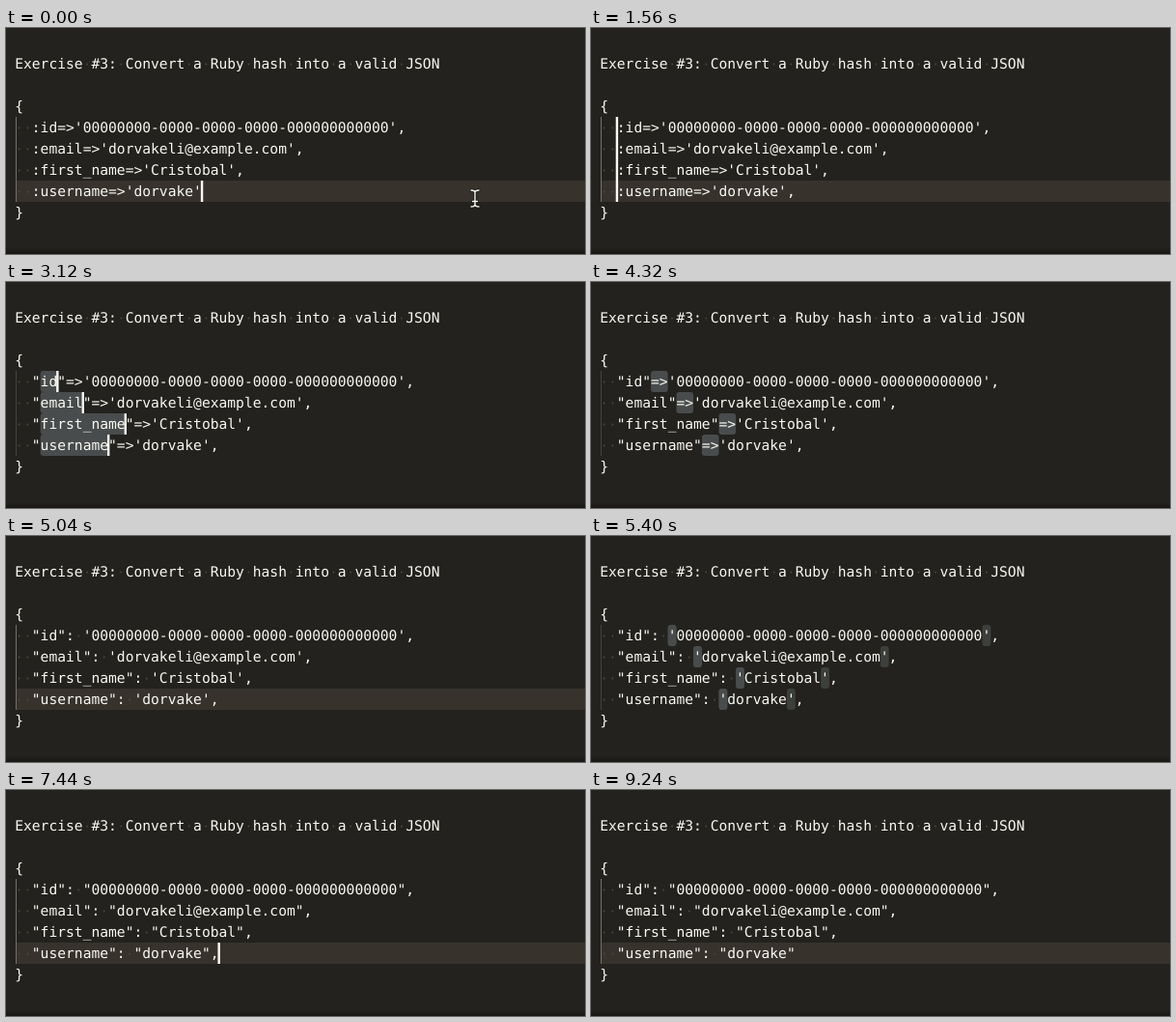
Animation, 600 px wide and 234 px high, one loop 9480 ms. Source, as an HTML page:

```html
<!DOCTYPE html>
<html lang="en">
<head>
<meta charset="utf-8">
<title>Ruby hash to JSON</title>
<style>
  html, body { margin: 0; width: 100%; height: 100%; overflow: hidden; background: #23221e; }
  svg { display: block; }
  text {
    font: 14.63px "DejaVu Sans Mono", monospace;
    fill: #f8f8f2;
    white-space: pre;
    text-rendering: geometricPrecision;
  }
  .dot { fill: #4b4a43; }
  .line { fill: #37332c; }
  .sel { fill: #494c4d; }
  .match { fill: #3d3f3d; }
  .caret { fill: #fbfbf6; }
</style>
</head>
<body>
<svg width="600" height="234" viewBox="0 0 600 234">
  <defs>
    <linearGradient id="shade" x1="0" y1="0" x2="0" y2="1">
      <stop offset="0" stop-color="#171613" stop-opacity="0"/>
      <stop offset="1" stop-color="#171613"/>
    </linearGradient>
  </defs>
  <rect width="600" height="234" fill="#23221e"/>
  <rect y="228" width="600" height="6" fill="url(#shade)"/>
  <g id="editor"></g>
  <g id="pointer" fill="none" stroke-linecap="round">
    <path id="beam" stroke="#161512" stroke-width="3"
      d="M-4-8.5Q0-8.5 0-6Q0-8.5 4-8.5M0-6V6M-4 8.5Q0 8.5 0 6Q0 8.5 4 8.5M-2.5 3H2.5"/>
    <use href="#beam" id="beamLight"/>
    <path stroke="#f4f4f0" stroke-width="1.4"
      d="M-4-8.5Q0-8.5 0-6Q0-8.5 4-8.5M0-6V6M-4 8.5Q0 8.5 0 6Q0 8.5 4 8.5M-2.5 3H2.5"/>
  </g>
</svg>
<script>
const LOOP = 9480, LEFT = 9.2, ADVANCE = 8.807, ROW = 22, TOP = 26, FIRST_ROW = 3;
const title = 'Exercise #3: Convert a Ruby hash into a valid JSON';
const entries = [
  ['id', '00000000-0000-0000-0000-000000000000'],
  ['email', 'dorvakeli@example.com'],
  ['first_name', 'Cristobal'],
  ['username', 'dorvake'],
];
const editor = document.getElementById('editor');
const pointer = document.getElementById('pointer');
document.getElementById('beamLight').remove();

// Each step changes only what it names; the caret sits after the named part.
const on = { on: true }, off = { on: false };
const steps = [
  [0, { open: ':', close: '', sep: '=>', ql: "'", qr: "'", last: '', caret: 'qr',
        shift: 0, from: null, match: '', rows: 1, on: true }],
  [300, off],
  [600, { last: ',', caret: 'tail', on: true }],
  [780, { caret: 'start' }],
  [1080, off],
  [1200, { rows: 2, on: true }],
  [1380, { rows: 3 }],
  [1560, { rows: 4 }],
  [1860, { from: 'start', caret: 'open', match: ':' }],
  [2100, { open: '', from: null, match: '' }],
  [2400, off],
  [2580, { from: 'open', shift: 1, on: true }],
  [2700, { caret: 'key', shift: 0 }],
  [3000, off],
  [3120, { open: '"', close: '"', on: true }],
  [3360, { from: null }],
  [3540, { caret: 'close' }],
  [3840, off],
  [3960, { from: 'close', shift: 1, on: true }],
  [4020, { caret: 'sep', shift: 0 }],
  [4320, off],
  [4440, { sep: ':', from: null, on: true }],
  [4740, { sep: ': ' }],
  [5040, off],
  [5100, { from: 'sep', caret: 'ql', match: "'", on: true }],
  [5400, off],
  [5520, { ql: '"', from: null, match: '', on: true }],
  [5820, off],
  [5940, { caret: 'tail', on: true }],
  [6180, { caret: 'qr' }],
  [6420, { qr: '' }],
  [6720, off],
  [7020, { qr: '"', on: true }],
  [7320, off],
  [7440, { rows: 1, caret: 'tail', on: true }],
  [7740, { last: '' }],
  [8040, off], [8340, on], [8640, off], [8940, on], [9240, off],
];

// Pointer appearances: start, end, x, y
const visits = [
  [0, 60, 486, 176.5],
  [6780, 6900, 573, 100],
  [6900, 7020, 575, 97.5],
  [9060, 9120, 556, 48],
  [9120, 9240, 566, 26.5],
];

const colX = col => LEFT + col * ADVANCE;
const rowY = row => TOP + row * ROW;
const rect = (cls, x, y, w, h, r = 0) =>
  `<rect class="${cls}" x="${x}" y="${y}" width="${w}" height="${h}" rx="${r}"/>`;
const mark = (cls, row, from, to) =>
  rect(cls, colX(from), rowY(row), (to - from) * ADVANCE, ROW, 3);

function drawText(row, text) {
  const dots = [...text].map((c, i) => c === ' '
    ? `<circle class="dot" cx="${colX(i + .5)}" cy="${rowY(row) + 11.5}" r=".9"/>` : '');
  return dots.join('') + `<text x="${LEFT}" y="${rowY(row) + 16}">${text}</text>`;
}

function layout(state, [key, val], isLast) {
  const parts = { start: '  ', open: state.open, key, close: state.close, sep: state.sep,
    ql: state.ql, val, qr: state.qr, tail: isLast ? state.last : ',' };
  const end = {};
  let text = '';
  for (const name in parts) {
    text += parts[name];
    end[name] = text.length;
  }
  return { text, end };
}

function draw(state) {
  const active = !state.from;
  const lastRow = FIRST_ROW + entries.length - 1;
  let back = active ? rect('line', 10, rowY(lastRow), 590, ROW) : '';
  let front = drawText(0, title) + drawText(2, '{') + drawText(lastRow + 1, '}');
  back += `<rect x="10" y="${rowY(FIRST_ROW)}" width="1" height="${ROW * entries.length}"
    fill="${active ? '#72716a' : '#44433d'}"/>`;

  const markMatches = (row, text) => [...text].forEach((c, i) => {
    if (c === state.match) back += mark('match', row, i, i + 1);
  });
  markMatches(0, title);

  entries.forEach((entry, i) => {
    const row = FIRST_ROW + i;
    const { text, end } = layout(state, entry, row === lastRow);
    markMatches(row, text);
    front += drawText(row, text);
    if (i < entries.length - state.rows) return;
    const caret = end[state.caret] + state.shift;
    if (state.from) back += mark('sel', row, end[state.from], caret);
    if (state.on) front += rect('caret', colX(caret) - 1.1, rowY(row), 2.4, ROW);
  });
  editor.innerHTML = back + front;
}

let shown = -1;
function render(time) {
  const count = steps.filter(([at]) => at <= time).length;
  if (count !== shown) {
    shown = count;
    draw(Object.assign({}, ...steps.slice(0, count).map(step => step[1])));
  }
  const visit = visits.find(([start, end]) => time >= start && time < end);
  pointer.style.display = visit ? '' : 'none';
  if (visit) pointer.setAttribute('transform', `translate(${visit[2]} ${visit[3]})`);
}

const begin = performance.now();
function tick() {
  render((performance.now() - begin) % LOOP);
  requestAnimationFrame(tick);
}
tick();
</script>
</body>
</html>
```
